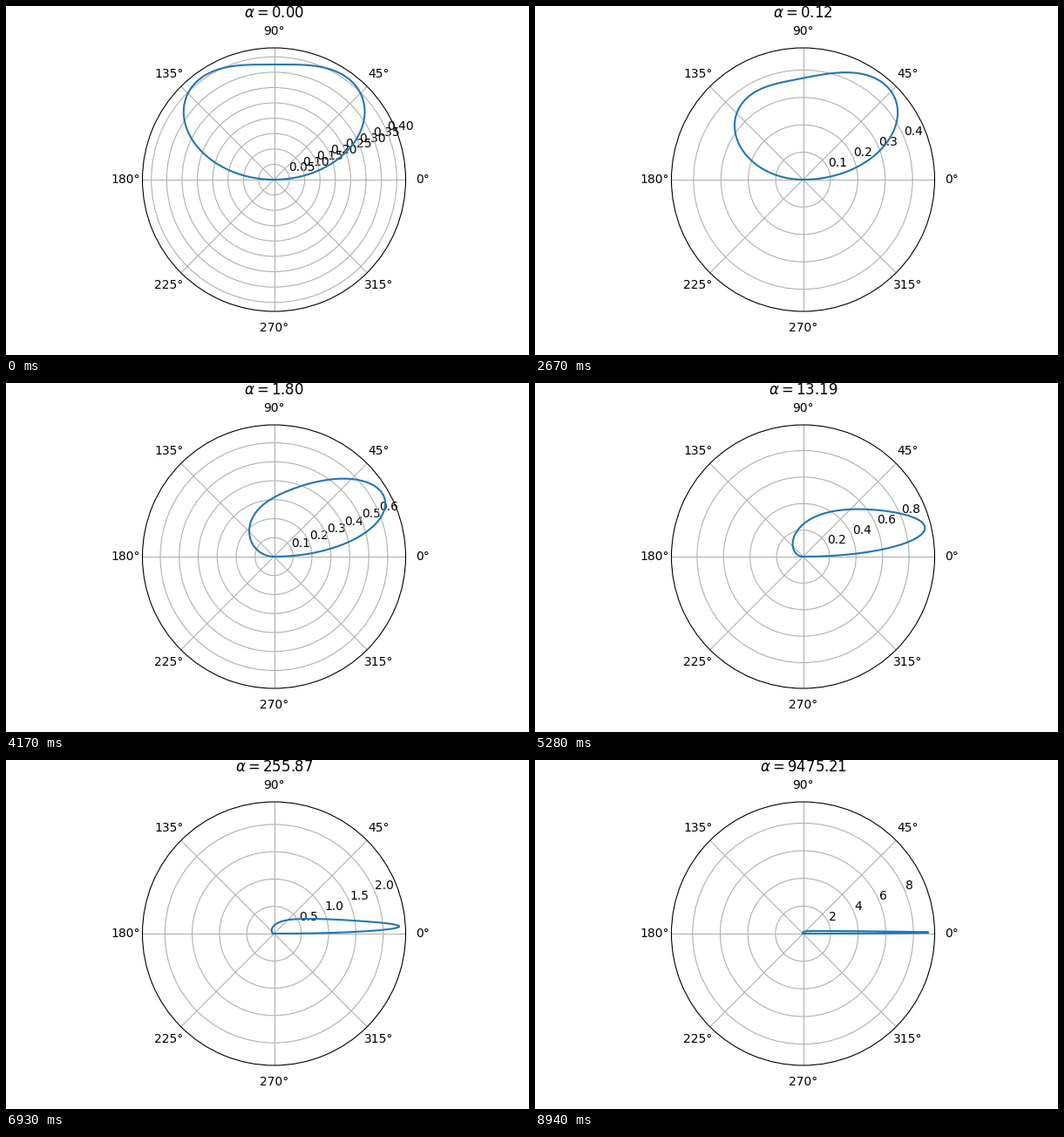
Animation of 600x400 px, one loop 8970 ms. Source, as a matplotlib script:

```python
import numpy as np
import matplotlib.pyplot as plt
from matplotlib.animation import FuncAnimation

FRAMES = 299
INTERVAL = 30

theta = np.linspace(0, np.pi, 1000)
alphas = np.logspace(-3, 4, FRAMES + 1)


def total(a):
    """Klein-Nishina cross section integrated over all angles."""
    b = 1 + 2 * a
    log = np.log1p(2 * a)
    return 2 * ((1 + a) / a**2 * (2 * (1 + a) / b - log / a)
                + log / (2 * a) - (1 + 3 * a) / b**2)


def density(a):
    """Probability density of the photon scattering angle."""
    p = 1 / (1 + a * (1 - np.cos(theta)))
    s = np.sin(theta)
    return s * p**2 * (p + 1 / p - s**2) / total(a)


fig = plt.figure(figsize=(6, 4), dpi=100, facecolor="white")
fig.subplots_adjust(left=0.125, right=0.9, bottom=0.125, top=0.88)
ax = fig.add_subplot(projection="polar")
line, = ax.plot(theta, density(alphas[0]))


def update(i):
    a = alphas[i]
    r = density(a)
    line.set_ydata(r)
    ax.set_ylim(0, 1.05 * r.max())
    ax.set_title(rf"$\alpha = {a:.2f}$")
    return line,


anim = FuncAnimation(fig, update, frames=FRAMES, init_func=lambda: update(0),
                     interval=INTERVAL, repeat=True, repeat_delay=0)
plt.show()
```
